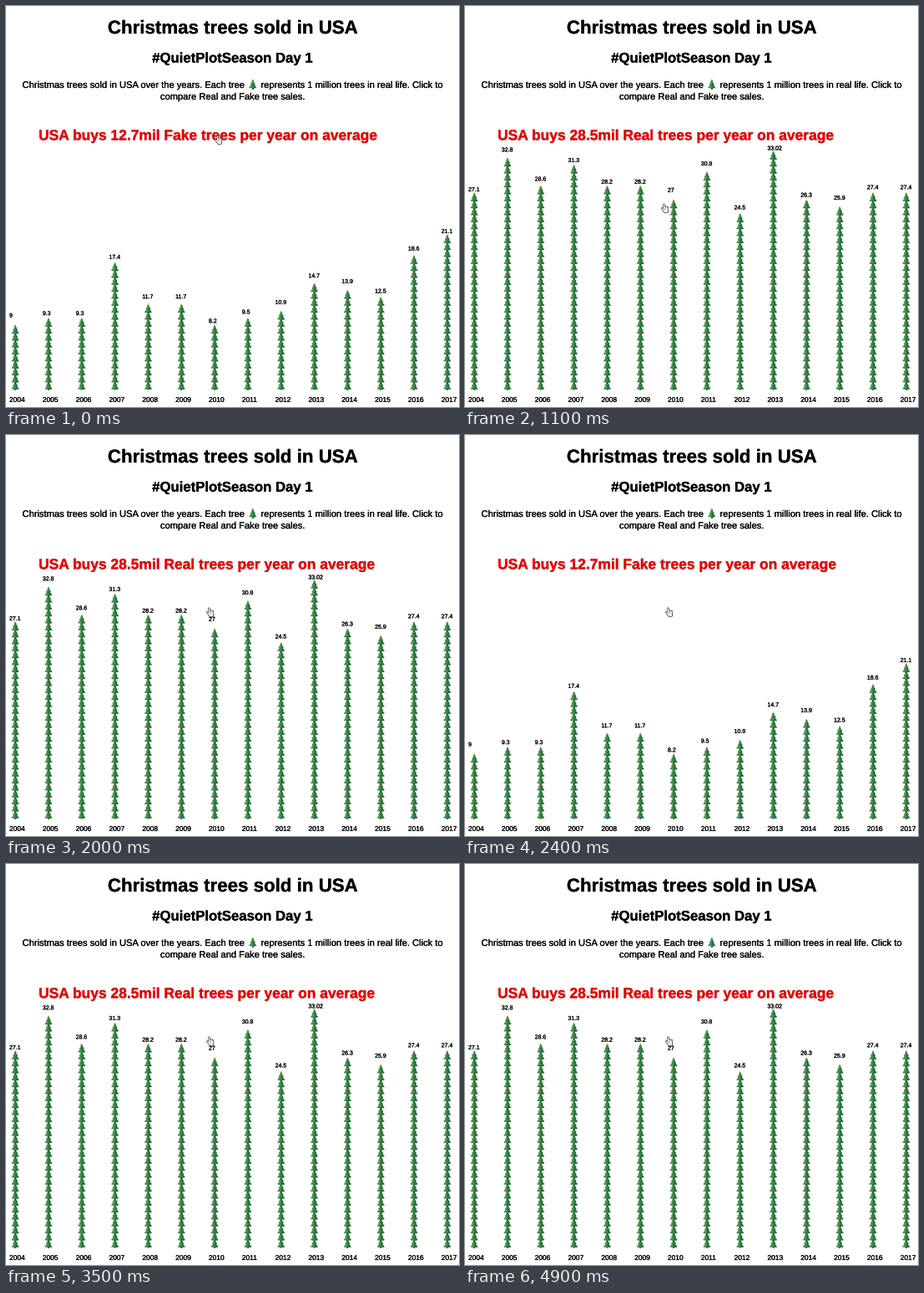
A matplotlib script for the animation above (5000 ms loop, 543x480 px).

```python
import math
import random

import matplotlib.pyplot as plt
import numpy as np
from matplotlib.animation import FuncAnimation
from matplotlib.collections import LineCollection, PolyCollection
from matplotlib.patheffects import withStroke

W, H, DPI = 543, 480, 96
PT = 72 / DPI     # points per pixel
FRAMES, INTERVAL = 50, 100
plt.rcParams["font.family"] = "Liberation Sans"
plt.rcParams["text.hinting"] = "none"

# Millions of trees per year, shown as the bar labels
REAL = [27.1, 32.8, 28.6, 31.3, 28.2, 28.2, 27, 30.8, 24.5, 33.02, 26.3, 25.9, 27.4, 27.4]
FAKE = [9, 9.3, 9.3, 17.4, 11.7, 11.7, 8.2, 9.5, 10.9, 14.7, 13.9, 12.5, 18.6, 21.1]
FIRST_YEAR = 2004
COLUMN = 39.83    # distance between years
ROW = 8.333       # height of one million trees
CLICKS = (1100, 2400, 3500)

fig = plt.figure(figsize=(W / DPI, H / DPI), dpi=DPI, facecolor="white")
ax = fig.add_axes([0, 0, 1, 1])
ax.set_xlim(0, W)
ax.set_ylim(H, 0)
ax.axis("off")


def write(x, y, text, px, color="black", weight="normal", ha="left"):
    outline = withStroke(linewidth=0.2 * PT, foreground=color)
    return ax.text(x, y, text, fontsize=px * PT, color=color, weight=weight,
                   ha=ha, va="baseline", zorder=3, path_effects=[outline])


def disc(x, y, r):
    a = np.linspace(0, 2 * math.pi, 8, endpoint=False)
    return np.column_stack([x + r * np.cos(a), y + r * np.sin(a)])


def tree_edge(side, width, tiers=3, height=11):
    """Zigzag outline of one half, from the tip down to the foot."""
    edge = [(0, 0.6)]
    for k in range(1, tiers + 1):
        reach, y = side * width * k / tiers, height * k / tiers - 0.6
        edge += [(reach, y), (reach * 0.68, y + 0.4)]
    return edge + [(0, height + 0.2)]


def make_tree():
    rng = random.Random(4)
    trunk = [(-0.8, 10), (0.8, 10), (0.8, 12.4), (-0.8, 12.4)]
    whole = tree_edge(1, 4.6) + tree_edge(-1, 4.6)[::-1]
    parts = [(trunk, "#65452b"), (whole, "#339150"), (tree_edge(1, 4.6), "#23703f")]
    for k in range(3):
        y = 2 + 2.9 * k
        light = [(-0.2, y), (-0.9 - 0.7 * k, y + 1.9), (0.9, y + 1.6)]
        parts.append((light, "#52ab66"))
    for k in range(7):
        y = 4 + k
        x = rng.uniform(-0.33, 0.33) * y
        parts.append((disc(x, y, 0.45), ("#c04c40", "#d9b654", "#2a4f38")[k % 3]))
    return parts + [(disc(0, 0.9, 0.8), "#d0ab3e")]


TREE = make_tree()


def draw_trees(spots):
    shapes = [(np.array(pts) + spot, color) for spot in spots for pts, color in TREE]
    polys, colors = zip(*shapes)
    return ax.add_collection(
        PolyCollection(polys, facecolors=colors, edgecolors="none", zorder=2),
        autolim=False)


def chart(kind, values):
    """All artists that belong to one kind of tree."""
    headline = f"USA buys {np.mean(values):.1f}mil {kind} trees per year on average"
    artists = [write(39, 160.4, headline, 17.42, "#e60000", "bold")]
    spots = []
    for i, value in enumerate(values):
        artists.append(write(4 + i * COLUMN, 447.6 - ROW * value, f"{value:g}", 6.97))
        spots += [(11 + i * COLUMN, 456.3 - ROW * n)
                  for n in range(1, math.ceil(value) + 1)]
    return artists + [draw_trees(spots)]


def hand_strokes():
    """Index finger, three bent fingers, thumb and palm as line segments."""
    strokes = [[(-1.6 + 1.5 * k, -1.9 + 0.4 * k if k else -4.3), (-0.9 + 1.1 * k, 4)]
               for k in range(4)]
    strokes.append([(-3.6, 0.3), (-1, 3.6)])
    strokes += [[(-1, y), (2.4, y)] for y in (2.8, 4)]
    return np.array(strokes)


write(271.5, 33, "Christmas trees sold in USA", 22.3, weight="bold", ha="center")
write(271.5, 67.6, "#QuietPlotSeason Day 1", 16.73, weight="bold", ha="center")
write(19.5, 98, "Christmas trees sold in USA over the years. Each tree", 11.15)
write(305.5, 98, "represents 1 million trees in real life. Click to", 11.15)
write(271.5, 112, "compare Real and Fake tree sales.", 11.15, ha="center")
draw_trees([(295.7, 87.4)])
for i in range(len(REAL)):
    write(4 + i * COLUMN, 474, str(FIRST_YEAR + i), 8.4)
ax.plot([0, W], [479.5, 479.5], color="#e4e4e4", lw=PT, zorder=1)

charts = [chart("Fake", FAKE), chart("Real", REAL)]

HAND = hand_strokes()
hand_layers = [
    ax.add_collection(LineCollection(HAND, colors=color, linewidths=px * PT,
                                     capstyle="round", zorder=5), autolim=False)
    for color, px in (("#333333", 2.6), ("white", 1.2))]


def ease(t, start, end):
    p = min(max((t - start) / (end - start), 0), 1)
    return p * p * (3 - 2 * p)


def pointer(t):
    down, up = ease(t, 0, 650), ease(t, 1500, 1950)
    return 255 - 15 * down + 5 * up, 160 + 82 * down - 30 * up


def update(frame):
    t = frame * INTERVAL
    shown = sum(t >= click for click in CLICKS) % 2
    for k, artists in enumerate(charts):
        for artist in artists:
            artist.set_visible(k == shown)
    for layer in hand_layers:
        layer.set_segments(HAND + pointer(t))
    return []


anim = FuncAnimation(fig, update, frames=FRAMES, interval=INTERVAL,
                     repeat=True, repeat_delay=0, blit=False)
plt.show()
```
